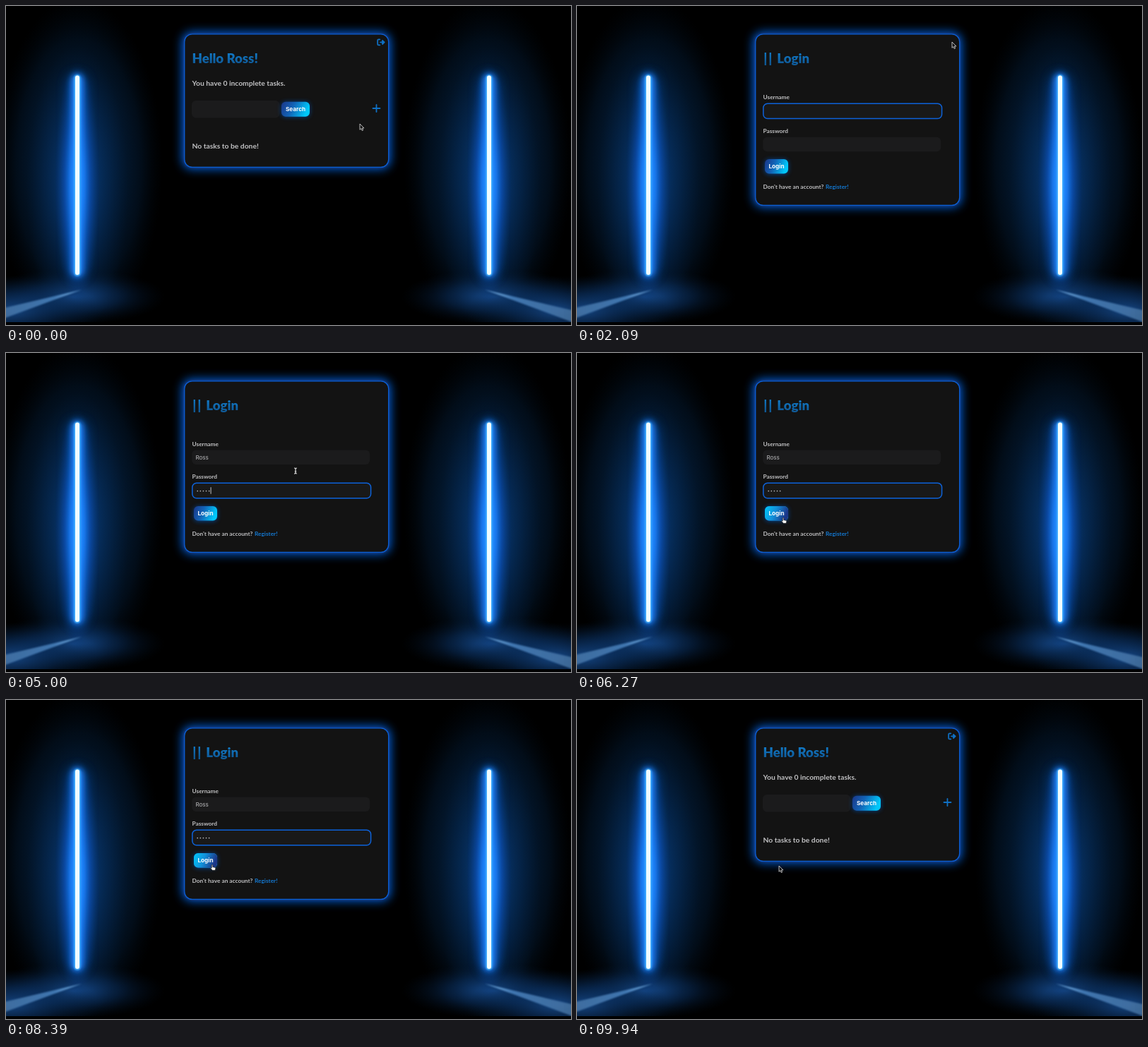
An HTML page for the animation above (10000 ms loop, 800x452 px).

```html
<!DOCTYPE html>
<html lang="en">
<head>
<meta charset="utf-8">
<title>Task list login</title>
<style>
  html, body { margin: 0; width: 100%; height: 100%; overflow: hidden; background: #000; }
  svg { display: block; width: 800px; height: 452px; }
  text { font: 700 10.3px Lato, sans-serif; fill: #c0c0c2; white-space: pre; }
  .title { font-weight: 900; font-size: 18.6px; fill: url(#titleInk); }
  .label { font-size: 8.3px; }
  .note { font-size: 8.3px; }
  .link { fill: #1479d2; }
  .value { font: 400 8.1px Inter, sans-serif; fill: #bdbdbf; }
  .btn { font: 700 8.2px Inter, sans-serif; fill: #fff; text-anchor: middle; }
  .card { fill: #131313; stroke: #0b5fd6; stroke-width: 1.3; }
  .field { fill: #1b1b1c; }
  .field.on { fill: #191919; stroke: #0d62da; stroke-width: 1.5; }
  .icon { fill: none; stroke: #0f70c4; stroke-width: 1.8; stroke-linecap: round; stroke-linejoin: round; }
  .band, #strip { display: none; }
  .load .band, .load #strip { display: inline; }
  .load .card { fill: #18181a; stroke: #77736c; stroke-width: 1; }
  .load text:not(.title):not(.link) { fill: #f4f4f5; }
  .load .field { fill: none; }
  .load .field.on { fill: #171718; stroke: #8b8b8b; stroke-width: 1; }
  .load #logout { display: none; }
  .load #plus { opacity: .6; }
  .load .halo { opacity: .8; }
</style>
</head>
<body>
<svg id="stage" viewBox="0 0 800 452">
  <defs>
    <linearGradient id="titleInk" x1="0" y1="0" x2="0" y2="1">
      <stop offset=".2" stop-color="#117ac8"/><stop offset=".8" stop-color="#0f5d9d"/>
    </linearGradient>
    <linearGradient id="btnInk" x1="0" y1="0" x2="1" y2=".25">
      <stop offset="0" stop-color="#1b3688"/><stop offset=".45" stop-color="#1263b6"/><stop offset="1" stop-color="#00c8fa"/>
    </linearGradient>
    <linearGradient id="btnHover" x1="0" y1="0" x2="1" y2=".25">
      <stop offset="0" stop-color="#00c8fa"/><stop offset=".5" stop-color="#128fd9"/><stop offset="1" stop-color="#1b3688"/>
    </linearGradient>
    <radialGradient id="wide">
      <stop offset="0" stop-color="#06305f"/><stop offset=".4" stop-color="#04203f" stop-opacity=".9"/>
      <stop offset=".75" stop-color="#020e1b" stop-opacity=".9"/><stop offset="1" stop-color="#01060c" stop-opacity="0"/>
    </radialGradient>
    <radialGradient id="middle">
      <stop offset="0" stop-color="#0b4ea6" stop-opacity=".75"/><stop offset=".5" stop-color="#07366f" stop-opacity=".4"/>
      <stop offset="1" stop-color="#042247" stop-opacity="0"/>
    </radialGradient>
    <radialGradient id="near">
      <stop offset="0" stop-color="#2f9cff"/><stop offset=".3" stop-color="#1975ea" stop-opacity=".9"/>
      <stop offset=".6" stop-color="#0e50b4" stop-opacity=".55"/><stop offset="1" stop-color="#083678" stop-opacity="0"/>
    </radialGradient>
    <radialGradient id="haze">
      <stop offset="0" stop-color="#1c5cae" stop-opacity=".75"/><stop offset=".5" stop-color="#0b3468" stop-opacity=".5"/>
      <stop offset="1" stop-color="#041428" stop-opacity="0"/>
    </radialGradient>
    <linearGradient id="beam" gradientUnits="userSpaceOnUse" x1="105" y1="0" x2="-18" y2="0">
      <stop offset="0" stop-color="#8cc6f6"/><stop offset=".3" stop-color="#4a83bf"/><stop offset="1" stop-color="#45719f"/>
    </linearGradient>
    <filter id="soft1" x="-50%" y="-20%" width="200%" height="140%"><feGaussianBlur stdDeviation="1.2"/></filter>
    <filter id="soft4" x="-300%" y="-20%" width="700%" height="140%"><feGaussianBlur stdDeviation="4"/></filter>
    <filter id="soft9" x="-300%" y="-20%" width="700%" height="140%"><feGaussianBlur stdDeviation="9"/></filter>
    <filter id="soft7" x="-20%" y="-20%" width="140%" height="140%"><feGaussianBlur stdDeviation="7"/></filter>
    <filter id="soft3" x="-40%" y="-60%" width="180%" height="220%"><feGaussianBlur stdDeviation="3"/></filter>

    <g id="lamp">
      <ellipse cx="103" cy="225" rx="119" ry="238" fill="url(#wide)"/>
      <ellipse cx="101" cy="260" rx="72" ry="205" fill="url(#middle)"/>
      <ellipse cx="95" cy="412" rx="130" ry="40" fill="url(#haze)"/>
      <ellipse cx="5" cy="432" rx="125" ry="50" fill="url(#haze)"/>
      <path d="M107 402L-20 432V449Z" fill="url(#beam)" opacity=".85" filter="url(#soft1)"/>
      <rect x="90" y="98" width="22" height="286" rx="11" fill="#0f5cd2" opacity=".8" filter="url(#soft9)"/>
      <ellipse cx="101" cy="252" rx="32" ry="172" fill="url(#near)"/>
      <rect x="93" y="96" width="16" height="288" rx="8" fill="#1f86ff" filter="url(#soft4)"/>
      <rect x="96.6" y="97.5" width="8.8" height="285" rx="4.4" fill="#4fb9ff" filter="url(#soft1)"/>
      <rect x="98" y="98.5" width="6" height="282.5" rx="3" fill="#f0fdff"/>
    </g>
  </defs>

  <rect width="800" height="452"/>
  <g id="room">
    <use href="#lamp"/>
    <use href="#lamp" transform="translate(785 0) scale(-1 1)"/>
  </g>
  <rect y="448" width="800" height="4"/>
  <rect id="strip" width="800" height="38.5" fill="#18181a"/>

  <g id="home">
    <rect class="halo" x="249.5" y="37" width="295" height="194" rx="14" fill="#0a60dc" filter="url(#soft7)"/>
    <rect class="card" x="252.7" y="39.8" width="289" height="188.6" rx="11"/>
    <path class="band" d="M253.3 122V51Q253.3 40.4 264 40.4H530.5Q541.2 40.4 541.2 51V122Z" fill="#131314"/>
    <text class="title" x="263.5" y="80.5">Hello Ross!</text>
    <g id="logout" class="icon">
      <path d="M529.3 47.4H527.6Q526.2 47.4 526.2 48.8V54Q526.2 55.4 527.6 55.4H529.3"/>
      <path d="M530 51.4H535.4M533 48.8L535.7 51.4L533 54Z" fill="#0f70c4"/>
    </g>
    <text x="263.5" y="112.6">You have 0 incomplete tasks.</text>
    <rect class="field" x="263" y="134" width="124.5" height="24.5" rx="6"/>
    <rect x="390" y="136" width="40" height="21" rx="6" fill="#0a4fae" opacity=".75" filter="url(#soft3)"/>
    <rect x="390" y="135.8" width="40" height="21" rx="6" fill="url(#btnInk)"/>
    <text class="btn" x="410" y="149.2">Search</text>
    <path id="plus" class="icon" d="M519.5 145H529.5M524.5 140V150"/>
    <text x="263.5" y="202.4">No tasks to be done!</text>
  </g>

  <g id="login">
    <rect class="halo" x="249.5" y="37" width="295" height="248" rx="14" fill="#0a60dc" filter="url(#soft7)"/>
    <rect class="card" x="252.7" y="39.8" width="289" height="242.6" rx="11"/>
    <path class="band" d="M253.3 106V51Q253.3 40.4 264 40.4H530.5Q541.2 40.4 541.2 51V106Z" fill="#131314"/>
    <text class="title" x="264.2" y="80.5" letter-spacing="2">||</text>
    <text class="title" x="283.3" y="80.5">Login</text>
    <text class="label" x="263.5" y="131.6">Username</text>
    <rect id="userBox" rx="6"/>
    <text id="userText" class="value"></text>
    <text id="passLabel" class="label" x="263.5">Password</text>
    <rect id="passBox" rx="6"/>
    <path id="dots" fill="none" stroke="#c4c4c6" stroke-width="1.7" stroke-linecap="round" stroke-dasharray="0 4.1"/>
    <rect id="caret" width=".9" height="9.5" fill="#d6d6d8"/>
    <rect x="266" y="217.5" width="33" height="21" rx="6" fill="#0a4fae" opacity=".75" filter="url(#soft3)"/>
    <rect x="266" y="217" width="33" height="20.6" rx="6" fill="url(#btnInk)"/>
    <rect id="hover" x="266" y="217" width="33" height="20.6" rx="6" fill="url(#btnHover)"/>
    <text class="btn" x="282.5" y="230.2">Login</text>
    <text class="note" x="263.5" y="258.8">Don't have an account?</text>
    <text class="note link" x="352" y="258.8">Register!</text>
  </g>

  <g id="pointer">
    <path id="arrow" d="M0 0V8.3L1.9 6.6L3.2 9.5L4.6 8.9L3.3 6H5.9Z" fill="#101010" stroke="#e4e4e4" stroke-width=".8"/>
    <path id="beamCursor" d="M-2 -4Q0 -4 0 -2.8Q0 -4 2 -4M0 -2.8V2.8M-2 4Q0 4 0 2.8Q0 4 2 4M-1.2 1H1.2" fill="none" stroke="#e2e2e2" stroke-width="1.2"/>
    <path id="hand" d="M-.8 .3Q0 -.6 .8 .3V3.2L4 3.8Q5 4.1 4.8 5.2L4.2 7.8H.2L-2.5 4.7Q-2.2 3.6 -.8 4.7Z" fill="#fff" stroke="#161616" stroke-width=".7"/>
  </g>
</svg>

<script>
  const LOOP = 10000;
  const LOGIN_AT = 1500, HOME_AT = 9060, TAB_AT = 3500;
  const LOADING = [[1500, 1700], [9060, 9300]];
  const TYPING = [2350, 4700];
  const HOVER_AT = 5330;
  const NAME = "Ross";
  const NAME_KEYS = [2450, 2620, 2820, 3000];
  const PASS_KEYS = [3900, 4080, 4270, 4480, 4650];

  // time, x, y of the pointer tip
  const PATH = [
    [0, 501, 167], [300, 501, 167], [1150, 531, 51], [4700, 531, 51],
    [5000, 410, 167], [5400, 292, 233.5], [8850, 292, 233.5],
    [9100, 285.5, 233], [9400, 286, 235]
  ];

  const el = id => document.getElementById(id);
  const show = (id, on) => el(id).style.display = on ? "" : "none";
  const set = (id, attrs) => {
    for (const key in attrs) el(id).setAttribute(key, attrs[key]);
  };
  const within = (t, [from, to]) => t >= from && t < to;
  const clamp = v => Math.max(0, Math.min(1, v));
  const ease = v => v * v * (3 - 2 * v);
  const typed = (keys, t) => keys.filter(k => k <= t).length;

  function pointerAt(t) {
    let i = PATH.length - 1;
    while (PATH[i][0] > t) i--;
    const a = PATH[i], b = PATH[i + 1] || a;
    const k = ease(clamp((t - a[0]) / (b[0] - a[0] || 1)));
    return [a[1] + (b[1] - a[1]) * k, a[2] + (b[2] - a[2]) * k];
  }

  function drawField(id, focused, y, restY) {
    set(id, focused
      ? { class: "field on", x: 263.8, y: y, width: 252.8, height: 21.4 }
      : { class: "field", x: 263.2, y: restY, width: 252, height: 20.5 });
  }

  function drawForm(t) {
    const inPass = t >= TAB_AT;
    drawField("userBox", !inPass, 138.2, 137.6);
    drawField("passBox", inPass, 184.3, 185.8);
    set("passLabel", { y: inPass ? 178 : 180 });

    const userX = inPass ? 268.4 : 269.4;
    set("userText", { x: userX, y: inPass ? 150.9 : 152.1 });
    el("userText").textContent = NAME.slice(0, typed(NAME_KEYS, t));

    const count = typed(PASS_KEYS, t);
    show("dots", count);
    if (count) set("dots", { d: `M271.2 195.5h${(count - 1) * 4.1 + .1}` });

    const keys = inPass ? [TAB_AT, ...PASS_KEYS] : [LOGIN_AT, ...NAME_KEYS];
    const lastKey = keys[typed(keys, t) - 1];
    show("caret", (t - lastKey) % 1000 < 500);
    const userEnd = userX + el("userText").getComputedTextLength();
    set("caret", inPass
      ? { x: count ? 269.1 + count * 4.1 : 269.4, y: 190.2 }
      : { x: userEnd + .2, y: 144.2 });

    el("hover").style.opacity = ease(clamp((t - HOVER_AT) / 300));
  }

  function drawPointer(t, login) {
    const [x, y] = pointerAt(t);
    const overButton = login && x > 266 && x < 299 && y > 217 && y < 238;
    const overLogout = !login && x > 525 && x < 537 && y < 57;
    const overFields = login && x > 264 && x < 517 && y > 138 && y < 207;
    const hand = overButton || overLogout;
    show("pointer", !within(t, TYPING));
    show("hand", hand);
    show("beamCursor", overFields && !hand);
    show("arrow", !hand && !overFields);
    set("pointer", { transform: `translate(${x} ${y})` });
  }

  function render(t) {
    const login = within(t, [LOGIN_AT, HOME_AT]);
    const loading = LOADING.some(span => within(t, span));
    el("stage").classList.toggle("load", loading);
    set("room", { transform: loading ? "translate(4 51) scale(1 .898)" : "translate(0 0)" });
    show("login", login);
    show("home", !login);
    if (login) drawForm(t);
    drawPointer(t, login);
  }

  const start = performance.now();
  function tick() {
    render((performance.now() - start) % LOOP);
    requestAnimationFrame(tick);
  }
  tick();
</script>
</body>
</html>
```
